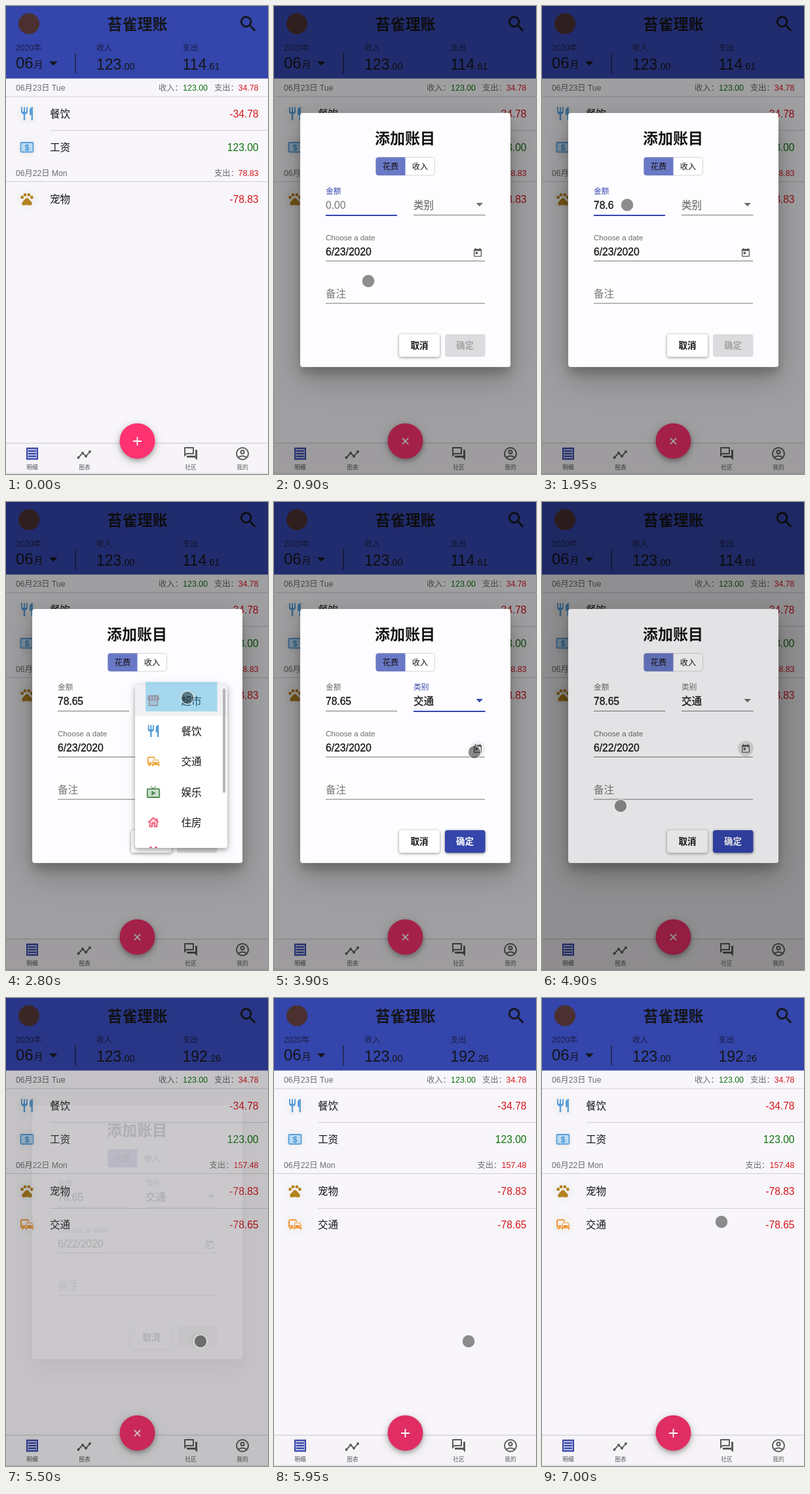
An HTML page that plays this animation: 400x713 px, repeating every 7050 ms.

```html
<!DOCTYPE html>
<html lang="zh">
<head>
<meta charset="utf-8">
<title>记账</title>
<style>
html, body { margin: 0; width: 100%; height: 100%; overflow: hidden; background: #f8f6fa; }
svg { display: block; width: 100vw; height: 100vh; font-family: "Liberation Sans", "Noto Sans CJK SC", "Noto Sans CJK", sans-serif; }
text { white-space: pre; }
#sum, #kind, #date { stroke-width: .3; }
.deep { filter: drop-shadow(0 11px 6px rgba(0,0,0,.14)) drop-shadow(0 15px 20px rgba(0,0,0,.26)); }
.soft { filter: drop-shadow(0 1px 2px rgba(0,0,0,.45)); }
.float { filter: drop-shadow(0 3px 3px rgba(0,0,0,.24)) drop-shadow(0 3px 7px rgba(0,0,0,.18)); }
</style>
</head>
<body>
<svg id="stage" viewBox="0 0 400 713"></svg>
<script>
const LOOP = 7050, STEP = 50;
const BLUE = '#3445ab', RED = '#d5161c', GREEN = '#10730f', GREY = '#6b6b6d', INK = '#151517';

// Moments of the interaction
const OPEN = 450, SELECT = 2650, PICK = 3350, CAL_OPEN = 3950, CAL_CLOSE = 4800, SAVE = 5450;
const KEYS = [1350, 1550, 1750, 1950, 2150];
const CURSOR = [
  [50, 268, 590], [400, 200, 663], [620, 200, 663], [900, 144, 419], [1050, 130, 303],
  [2250, 130, 303], [2600, 277, 298], [2950, 277, 298], [3250, 285, 396], [3450, 285, 396],
  [3900, 306, 381], [4000, 310, 376], [4300, 310, 376], [4700, 117, 438], [4800, 117, 438],
  [4900, 120, 463], [5350, 297, 523], [6050, 297, 523], [6750, 274, 341]
];

const PATHS = {
  food: 'M11 9H9V2H7v7H5V2H3v7c0 2.12 1.66 3.84 3.75 3.97V22h2.5v-9.03C11.34 12.84 13 11.12 13 9V2h-2v7zm5-3v8h2.5v8H21V2c-2.76 0-5 2.24-5 4z',
  paw: 'M2 9.5a2.5 2.5 0 1 0 5 0a2.5 2.5 0 1 0-5 0M6.5 5.5a2.5 2.5 0 1 0 5 0a2.5 2.5 0 1 0-5 0M12.5 5.5a2.5 2.5 0 1 0 5 0a2.5 2.5 0 1 0-5 0M17 9.5a2.5 2.5 0 1 0 5 0a2.5 2.5 0 1 0-5 0M17.3 14.9l-2.5-2.9c-1.6-1.9-4-1.9-5.6 0l-2.5 2.9C5.4 16.2 3.8 17.6 4.1 19.7c.3 1 1 2 2.3 2.3c.7.15 3.1-.44 5.6-.44s4.9.58 5.6.44c1.3-.3 2-1.3 2.3-2.3c.3-2-1.3-3.5-2.6-4.8z',
  commute: 'M12 4H5C3.34 4 2 5.34 2 7v8c0 1.66 1.34 3 3 3l-1 1v1h1l2-2.03L9 18v-5H4V5.98L13 6v2h2V7c0-1.66-1.34-3-3-3zM5 14a1 1 0 1 1 0 2a1 1 0 1 1 0-2zm15.57-4.34c-.14-.4-.52-.66-.97-.66h-7.19c-.46 0-.83.26-.98.66L10 13.77l.01 5.51c0 .38.31.72.69.72h.62c.38 0 .68-.38.68-.76V18h8v1.24c0 .38.31.76.69.76h.61c.38 0 .69-.34.69-.72l.01-5.51zm-8.16.34h7.19l1.03 3h-9.25zM12 14a1 1 0 1 0 0 2a1 1 0 1 0 0-2zm8 0a1 1 0 1 0 0 2a1 1 0 1 0 0-2z',
  search: 'M15.5 14h-.79l-.28-.27A6.5 6.5 0 1 0 13.73 14.43l.27.28v.79l5 4.99L20.49 19zm-6 0a4.5 4.5 0 1 1 0-9a4.5 4.5 0 1 1 0 9z',
  receipt: 'M3 22l1.5-1.5L6 22l1.5-1.5L9 22l1.5-1.5L12 22l1.5-1.5L15 22l1.5-1.5L18 22l1.5-1.5L21 22V2l-1.5 1.5L18 2l-1.5 1.5L15 2l-1.5 1.5L12 2l-1.5 1.5L9 2 7.5 3.5 6 2 4.5 3.5 3 2zM5 4.9h14v14.2H5zM6 7h12v2H6zM6 11h12v2H6zM6 15h12v2H6z',
  forum: 'M15 4v7H5.17L4 12.17V4h11m1-2H3c-.55 0-1 .45-1 1v14l4-4h10c.55 0 1-.45 1-1V3c0-.55-.45-1-1-1zm5 4h-2v9H6v2c0 .55.45 1 1 1h11l4 4V7c0-.55-.45-1-1-1z',
  today: 'M19 3h-1V1h-2v2H8V1H6v2H5c-1.1 0-2 .9-2 2v14c0 1.1.9 2 2 2h14c1.1 0 2-.9 2-2V5c0-1.1-.9-2-2-2zm0 16H5V8h14zM7 10h5v5H7z',
  tv: 'M21 6h-7.59l3.29-3.29L16 2l-4 4-4-4-.71.71L10.59 6H3c-1.1 0-2 .9-2 2v12c0 1.1.9 2 2 2h18c1.1 0 2-.9 2-2V8c0-1.1-.9-2-2-2zm0 14H3V8h18zM9 10v8l7-4z',
  house: 'M12 5.7l5 4.5V18h-2v-6H9v6H7v-7.8zM12 3L2 12h3v8h6v-6h2v6h6v-8h3l-3-2.7V5h-2.5v2z',
  shop: 'M4 3h16l2 6c0 1.6-.8 2.5-2 2.9V21H4v-9.1C2.8 11.5 2 10.6 2 9zM6 12v7h12v-7zM7 5l-.7 5h2.2L9 5zm4.2 0v5H13V5zm3.8 0l.6 5h2.2L17 5z'
};
// Pale inner areas of two-tone icons
const TINTS = {
  receipt: 'M5 4.9h14v14.2H5z', tv: 'M3 8h18v12H3z', house: 'M7 10l5-4.5l5 4.5v8H7z', shop: 'M6 5h12v14H6z'
};

const text = (x, y, size, str, fill = INK, extra = '') =>
  `<text x="${x}" y="${y}" font-size="${size}" fill="${fill}" ${extra}>${str}</text>`;
const END = 'text-anchor="end"', MID = 'text-anchor="middle"';
const rect = (x, y, w, h, fill, extra = '') =>
  `<rect x="${x}" y="${y}" width="${w}" height="${h}" fill="${fill}" ${extra}/>`;
const disc = (x, y, r, fill, extra = '') => `<circle cx="${x}" cy="${y}" r="${r}" fill="${fill}" ${extra}/>`;
const icon = (name, cx, cy, scale, fill) =>
  `<g fill="${fill}" transform="translate(${cx} ${cy}) scale(${scale}) translate(-12 -12)">`
  + `<path d="${TINTS[name] || ''}" opacity=".3"/><path d="${PATHS[name]}" fill-rule="evenodd"/></g>`;
const arrow = (x, y, w, fill, extra = '') =>
  `<path d="M${x} ${y}h${w}l${-w / 2} ${w / 2}z" fill="${fill}" ${extra}/>`;
const group = (id, body) => `<g id="${id}">${body}</g>`;

const banknote = rect(22.5, 208, 19, 14.5, '#b9daf3', 'rx="1.5" stroke="#5b9fd8" stroke-width="1.8"')
  + text(32, 219.5, 12, '$', '#3f8fd0', MID + ' font-weight="700"');

function row(y, name, amount, fill, mark) {
  return disc(32, y, 16, '#f3f2f4') + mark + text(67, y + 5.5, 15.5, name)
    + text(385.5, y + 5.5, 15.6, amount, fill, END);
}

function app() {
  const total = (x, label, id, whole, cents) => text(x, 67.5, 12, label, '#1b2045')
    + text(x, 97, 23, `<tspan id="${id}">${whole}</tspan><tspan font-size="14.5" id="${id}Cents">${cents}</tspan>`);
  const tab = (x, name, mark, fill) => mark + text(x, 706, 8.7, name, fill, MID);
  const user = `<g fill="none" stroke="#5c5c5e" stroke-width="2">${disc(361, 682, 9, 'none')}`
    + `${disc(361, 679.5, 2.6, 'none')}<path d="M354.5 688c3.5-3.5 9.5-3.5 13 0"/></g>`;
  return rect(0, 0, 400, 713, '#f8f6fa') + rect(0, 0, 400, 110.5, BLUE)
    + disc(35, 27, 16, '#4b3030')
    + text(200.5, 36, 23, '苔雀理账', INK, MID + ' font-weight="700"')
    + icon('search', 370, 27.3, 1.34, INK)
    + text(15, 67.5, 12.3, '2020年', '#1b2045') + text(15, 95, 24, '06') + text(42.5, 94, 14, '月')
    + arrow(66, 84.5, 12.5, INK) + rect(105.5, 72, 1, 31, INK)
    + total(138, '收入', 'income', '123', '.00') + total(269.5, '支出', 'spent', '114', '.61')
    + text(15, 129, 12.2, '06月23日 Tue', GREY)
    + text(233, 129, 12.3, '收入：', GREY) + text(308, 129, 12.4, '123.00', GREEN, END)
    + text(318, 129, 12.3, '支出：', GREY) + text(385.5, 129, 12.4, '34.78', RED, END)
    + rect(0, 137.5, 400, 1, '#cfced1') + rect(67, 189, 333, 1, '#cfced1')
    + row(164, '餐饮', '-34.78', RED, icon('food', 32, 164, 1, '#5b9fd8'))
    + row(215.5, '工资', '123.00', GREEN, banknote)
    + text(15, 258.5, 12.2, '06月22日 Mon', GREY)
    + text(318, 258.5, 12.3, '支出：', GREY, 'id="dayLabel"') + text(385.5, 258.5, 12.4, '78.83', RED, END + ' id="daySum"')
    + rect(0, 267, 400, 1, '#cfced1')
    + row(294, '宠物', '-78.83', RED, icon('paw', 32, 294, .98, '#b3821f'))
    + group('added', rect(67, 320, 333, 1, '#cfced1')
      + row(345.5, '交通', '-78.65', RED, icon('commute', 32, 345, 1, '#f0993a')))
    + rect(0, 666, 400, 47, '#f6f4f7') + rect(0, 665.5, 400, 1, '#c9c8cb') + rect(0, 711.5, 400, 1, '#dddcdf')
    + tab(40, '明细', icon('receipt', 40, 682, 1, BLUE), '#4a4a4c')
    + tab(120, '图表', '<path d="M110.5 688l6.500-7l5 5l6-7" fill="none" stroke="#5c5c5e" stroke-width="1.9"/>'
      + [[110.5, 688], [117, 681], [122, 686], [128, 679]].map(p => disc(...p, 2, '#5c5c5e')).join(''), '#5c5c5e')
    + tab(282, '社区', icon('forum', 282, 682, 1, '#5c5c5e'), '#5c5c5e')
    + tab(361, '我的', user, '#5c5c5e')
    + disc(200.5, 662.7, 27, '#ff3371', 'id="fab" class="float"')
    + '<path id="plus" d="M-6.500 0h13M0-6.500v13" stroke="#fff" stroke-width="1.8"/>';
}

function dialog() {
  const line = (id, x, y, w) => rect(x, y, w, 1, '#77767a', `id="${id}"`);
  const bold = MID + ' font-weight="700"';
  return rect(40, 163, 321, 387, '#fdfcfe', 'rx="4" class="deep"')
    + text(200, 210, 23, '添加账目', INK, bold)
    + rect(155.5, 230.5, 90, 27.5, '#fff', 'rx="4" stroke="#d5d4d8"')
    + '<path d="M200.5 230.5h-41a4 4 0 0 0-4 4v19.5a4 4 0 0 0 4 4h41z" fill="#6a79c6"/>'
    + text(178, 248.7, 12.2, '花费', INK, MID) + text(223, 248.7, 12.2, '收入', INK, MID)
    + text(79, 286, 11.7, '金额', GREY, 'id="sumLabel"') + text(79, 309, 15.6, '', INK, 'id="sum"') + line('sumLine', 79, 318, 109)
    + text(213, 286, 11.7, '类别', GREY, 'id="kindLabel"') + text(213, 309, 15.5, '', INK, 'id="kind"') + line('kindLine', 213, 318, 109.5)
    + arrow(308.5, 300, 10.5, GREY, 'id="kindArrow"')
    + text(79, 356.5, 11.6, 'Choose a date', GREY) + text(79, 380, 15.7, '', INK, `id="date" stroke="${INK}"`) + line('dateLine', 79, 388, 243)
    + disc(311, 375.5, 12, '#000', 'id="halo"') + icon('today', 311, 376, .67, '#5a5a5c')
    + text(79, 444, 15.5, '备注', '#777') + line('noteLine', 79, 452.5, 243)
    + rect(191, 500, 62, 34.5, '#fff', 'rx="4" class="soft"') + text(222, 522.3, 13.5, '取消', INK, bold)
    + rect(261, 500, 61.5, 34.5, '#dcdbdd', 'rx="4" id="okBox"') + text(291.5, 522.3, 13.5, '确定', '#a5a4a6', bold + ' id="ok"');
}

function menu() {
  const options = [
    ['超市', 'shop', '#d98078'], ['餐饮', 'food', '#4f9ad6'], ['交通', 'commute', '#f0a02f'],
    ['娱乐', 'tv', '#4d8a52'], ['住房', 'house', '#f0607f']
  ];
  return rect(197, 278, 141, 249, '#fff', 'rx="4" class="float"')
    + rect(197, 278, 141, 48, '#f1f0f2') + rect(197, 373, 141, 46, '#f1f0f2', 'id="hover"')
    + options.map(([name, mark, fill], i) => icon(mark, 225, 302.5 + 46.4 * i, .92, fill)
      + text(267.5, 308.5 + 46.4 * i, 15.6, name)).join('')
    + '<path d="M219 527a2 2 0 0 1 4 0M227 527a2 2 0 0 1 4 0" fill="#e0465a"/>'
    + rect(331, 284, 4, 159, '#b5b4b7', 'rx="2"');
}

function calendar() {
  const cell = 43.4, col = i => 48 + cell * (i + .5);
  let out = rect(40, 156, 320, 400, '#fff', 'rx="4" class="deep"')
    + text(64, 192, 13.5, 'JUN 2020', INK, 'font-weight="700"') + arrow(136, 185, 9, GREY)
    + '<path d="M290 182l-5 5l5 5M328 182l5 5l-5 5" fill="none" stroke="#6b6b6d" stroke-width="2"/>'
    + [...'SMTWTFS'].map((d, i) => text(col(i), 229, 11, d, '#8b8a8d', MID)).join('')
    + rect(40, 240, 320, 1, '#e0dfe2') + text(col(0), 267, 13, 'JUN', GREY, MID)
    + disc(0, 436, 19, BLUE, 'id="chosen"');
  for (let d = 1; d <= 30; d++)
    out += text(col(d % 7), 310.5 + cell * Math.floor(d / 7), 13.5, d, INK, `${MID} id="day${d}"`);
  return out;
}

const $ = id => document.getElementById(id);
$('stage').innerHTML = app()
  + rect(0, 0, 400, 713, '#000', 'id="dim"') + group('dialog', dialog())
  + group('menu', menu()) + rect(213, 274, 109.5, 45, '#33b5e5', 'id="tap"')
  + rect(0, 0, 400, 713, '#000', 'id="dim2"') + group('calendar', calendar())
  + disc(0, 0, 9.8, '#000', 'id="cursor" fill-opacity=".44" stroke="#fff" stroke-opacity=".7" stroke-width="1.3"');

const set = (id, attrs) => { for (const k in attrs) $(id).setAttribute(k, attrs[k]); };
const show = (id, alpha) => set(id, { opacity: alpha, visibility: alpha > 0 ? 'visible' : 'hidden' });
const write = (id, str) => { $(id).textContent = str; };
const ramp = (t, from, span) => Math.min(1, Math.max(0, (t - from) / span));
const ease = x => 1 - (1 - x) ** 4;
const shade = (t, from, to) => ease(ramp(t, from, 400)) - ease(ramp(t, to, 400));

function popup(id, t, from, to, cy) {
  const grow = ease(ramp(t, from, 150));
  const s = .7 + .3 * grow;
  show(id, grow * (1 - ramp(t, to, 75)) ** 2);
  set(id, { transform: `translate(200 ${cy}) scale(${s}) translate(-200 ${-cy})` });
}

function field(id, str, fill) {
  write(id, str);
  set(id, { fill, stroke: fill });
}

function focusLine(id, on) {
  set(id, { height: on ? 2 : 1, fill: on ? BLUE : '#77767a' });
}

function cursorAt(t) {
  const i = CURSOR.findIndex(k => k[0] > t);
  if (i < 1) return CURSOR[i < 0 ? CURSOR.length - 1 : 0].slice(1);
  const [t0, x0, y0] = CURSOR[i - 1], [t1, x1, y1] = CURSOR[i];
  const p = (t - t0) / (t1 - t0);
  return [x0 + (x1 - x0) * p, y0 + (y1 - y0) * p];
}

function draw(t) {
  const saved = t >= SAVE, picked = t >= PICK, moved = t >= CAL_CLOSE - 100;
  write('spent', saved ? '192' : '114');
  write('spentCents', saved ? '.26' : '.61');
  write('daySum', saved ? '157.48' : '78.83');
  set('dayLabel', { x: saved ? 310.5 : 318 });
  show('added', saved ? 1 : 0);

  const turn = 45 * (ramp(t, OPEN, 150) - ramp(t, SAVE + 100, 150));
  const tone = 1 - .12 * ramp(t, SAVE + 50, 200);
  set('plus', { transform: `translate(200.5 663) rotate(${turn})` });
  set('fab', { fill: `rgb(${[255, 51, 113].map(c => Math.round(c * tone))})` });

  show('dim', .36 * shade(t, OPEN, SAVE));
  popup('dialog', t, OPEN, SAVE, 356.5);

  const typed = '78.65'.slice(0, KEYS.filter(k => k <= t).length);
  const onSum = t < SELECT, onKind = t >= SELECT && t < CAL_OPEN, ready = picked && !saved;
  field('sum', typed || '0.00', typed ? INK : '#8b8a8d');
  set('sumLabel', { fill: onSum ? BLUE : GREY });
  focusLine('sumLine', onSum);
  field('kind', picked ? '交通' : onSum ? '类别' : '', picked ? INK : '#777');
  set('kindLabel', { fill: onKind ? BLUE : GREY });
  show('kindLabel', picked ? 1 : 0);
  set('kindArrow', { fill: onKind ? BLUE : GREY });
  focusLine('kindLine', onKind);
  write('date', moved ? '6/22/2020' : '6/23/2020');
  show('halo', t < 3850 ? 0 : t < CAL_OPEN ? .05 : t < 5300 ? .12 : 0);
  set('okBox', { fill: ready ? BLUE : '#dcdbdd', class: ready ? 'soft' : '' });
  set('ok', { fill: ready ? '#fff' : '#a5a4a6' });

  show('menu', ramp(t, SELECT, 120) * (1 - ramp(t, PICK, 100)));
  show('hover', t >= 3200 ? 1 : 0);
  show('tap', t >= SELECT && t < 2900 ? .4 : 0);

  show('dim2', .32 * shade(t, CAL_OPEN, CAL_CLOSE));
  popup('calendar', t, CAL_OPEN, CAL_CLOSE, 356);
  set('chosen', { cx: 48 + 43.4 * (moved ? 1.5 : 2.5) });
  set('day22', { fill: moved ? '#fff' : INK });
  set('day23', { fill: moved ? INK : '#fff' });

  const [x, y] = cursorAt(t);
  set('cursor', { cx: x, cy: y });
  show('cursor', t >= 50 ? 1 : 0);
}

const start = performance.now();
function tick() {
  const t = (performance.now() - start) % LOOP;
  draw(Math.floor(t / STEP) * STEP);
  requestAnimationFrame(tick);
}
tick();
</script>
</body>
</html>
```
